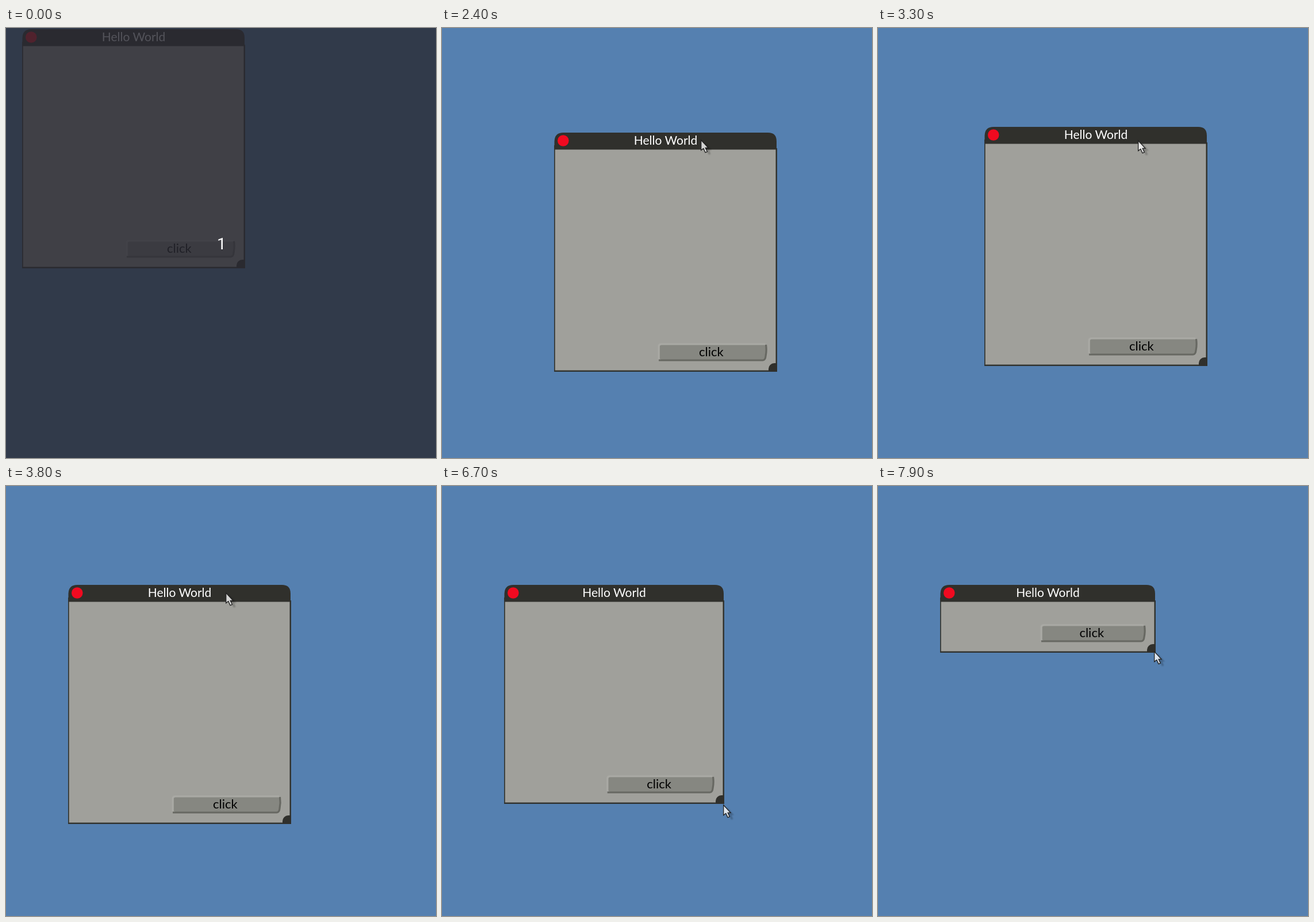
Animation of 748x748 px, one loop 8000 ms. Source, as an HTML page:

```html
<!DOCTYPE html>
<html lang="en">
<head>
<meta charset="utf-8">
<title>Hello World window</title>
<style>
  html, body { margin: 0; width: 100%; height: 100%; overflow: hidden; background: #5580b0; }
  svg { display: block; width: 748px; height: 748px; }
  .label { font-family: Lato, "Open Sans", sans-serif; text-anchor: middle; }
  .edge { fill: none; stroke-width: 3.2; }
</style>
</head>
<body>
<svg viewBox="0 0 748 748">
  <defs>
    <path id="arrow" d="M.7 1V18.6L4.8 15.4L8.2 22.6L11.4 21.2L8.2 14.4H13Z"/>
    <filter id="soft" x="-50%" y="-50%" width="200%" height="200%"><feGaussianBlur stdDeviation=".8"/></filter>
  </defs>
  <rect width="748" height="748" fill="#5580b0"/>
  <g id="win">
    <path id="frame" fill="#31332f"/>
    <path id="body" fill="#a0a09b"/>
    <path id="bar" fill="#30302c"/>
    <path id="grip" fill="#30302c"/>
    <circle cx="15.8" cy="14" r="9.8" fill="#f00a20"/>
    <text id="title" class="label" y="21" font-size="21" fill="#fff">Hello World</text>
    <g id="button">
      <rect id="face" rx="4" fill="#868781"/>
      <path id="light" class="edge" stroke="#a9a9a4"/>
      <path id="dark" class="edge" stroke="#676862"/>
    </g>
    <text id="click" class="label" font-size="22" fill="#000">click</text>
  </g>
  <g id="cursor">
    <use href="#arrow" x="6" y="4" opacity=".22" filter="url(#soft)"/>
    <use href="#arrow" fill="#fff" fill-opacity=".8" stroke="#222" stroke-width="1.3"/>
  </g>
  <g id="intro">
    <rect width="748" height="748" fill="rgb(40,41,49)" fill-opacity=".8"/>
    <text x="367" y="385" font-size="28" fill="#fff" font-family="Roboto, 'Noto Sans', sans-serif">1</text>
  </g>
</svg>
<script>
  // All motion is in steps of 100 ms
  const STEP = 100, LOOP = 8000;
  const $ = id => document.getElementById(id);

  function set(id, attrs) {
    for (const name in attrs) $(id).setAttribute(name, attrs[name]);
  }

  const ramp = (s, from, to) => Math.min(1, Math.max(0, (s - from) / (to - from)));
  const ease = (s, from, to) => {
    const p = ramp(s, from, to);
    return p * p * (3 - 2 * p);
  };
  const bezier = (p, a, b, c, d) => {
    const q = 1 - p;
    return q * q * q * a + 3 * q * q * p * b + 3 * q * p * p * c + p * p * p * d;
  };

  // The window swings down in an arc, then circles once
  function corner(s) {
    if (s < 27) {
      const p = ramp(s, 19, 27);
      return [bezier(p, 28, 430, 124, 104), bezier(p, 2, 235, 183, 162)].map(Math.round);
    }
    const angle = -3.4 + 6.06 * (1 - (1 - ramp(s, 27, 38)) ** 1.3);
    return [146.5 + 43.5 * Math.cos(angle), 151 + 45 * Math.sin(angle)].map(Math.round);
  }

  // Resizing: a slow pull, a long pull, and a last one
  function size(s) {
    const a = ease(s, 61, 67), b = ease(s, 67, 75), c = ease(s, 77, 81);
    return [388 - 5 * a - 5 * b - 6 * c, 416 - 35 * a - 245 * b - 36 * c].map(Math.round);
  }

  // While dragging, the pointer runs half a step ahead of the window
  function lead(fn, s) {
    return fn(String(fn(s)) === String(fn(s - 1)) ? s : s + .5);
  }

  function pointer(s) {
    const [x, y] = lead(corner, s), [w, h] = lead(size, s);
    const hover = ease(s, 39, 47), toGrip = ease(s, 57, 60), grab = ramp(s, 15, 17);
    const nudge = 10 * ramp(s, 7, 9) - (s < 11 ? 0 : 3);
    return [
      x + 273 + grab + 63 * hover + 49 * toGrip + w - 388,
      y + 26 + nudge - 20 * grab + 372 * hover + 35 * toGrip + h - 416
    ].map(Math.round);
  }

  function drawButton(w, h, pressed) {
    const l = w * .468, r = w - 17, t = h - 50, b = h - 18, mid = (l + r) / 2;
    set('face', { x: l + 2, y: t + 3, width: r - l - 4, height: b - t - 6 });
    set('light', { d: `M${l + .5} ${b - 4}V${t + 6}Q${l + .5} ${t + 1.8} ${l + 5} ${t + 1.8}H${r - 4}` });
    set('dark', {
      d: `M${l + .5} ${b - 2}H${r - 8}Q${r - 3.5} ${b - 2.5} ${r - 3} ${b - 9}Q${r - 1} ${b - 19} ${r - 2.5} ${t + 3}`
    });
    set('button', { transform: pressed ? `rotate(180 ${mid - 1.2} ${(t + b) / 2})` : '' });
    set('click', { x: mid - 3, y: h - 27 });
  }

  function drawWindow([x, y], [w, h]) {
    set('win', { transform: `translate(${x} ${y})` });
    set('frame', { d: `M0 22H2V27H${w}V${h}H0Z` });
    set('body', { d: `M1.7 28H${w - 2.5}V${h - 2.5}H1.7Z` });
    set('bar', { d: `M.5 29.5V15Q1 0 16 0H${w - 16}Q${w - 1} 0 ${w - 1} 15V29.5Z` });
    set('grip', { d: `M${w} ${h}H${w - 15}V${h - 5}A10 10 0 0 1 ${w - 5} ${h - 15}H${w}Z` });
    set('title', { x: w / 2 });
  }

  function draw(s) {
    const [w, h] = size(s);
    const pressed = (s >= 50 && s < 52) || (s >= 54 && s < 58);
    const intro = s < 3;
    drawWindow(corner(s), [w, h]);
    drawButton(w, h, pressed);
    set('cursor', {
      transform: `translate(${pointer(s).join(' ')})`,
      visibility: intro ? 'hidden' : 'visible'
    });
    set('intro', { visibility: intro ? 'visible' : 'hidden' });
  }

  const start = performance.now();
  function tick() {
    draw(Math.floor(((performance.now() - start) % LOOP) / STEP));
    requestAnimationFrame(tick);
  }
  tick();
</script>
</body>
</html>
```
